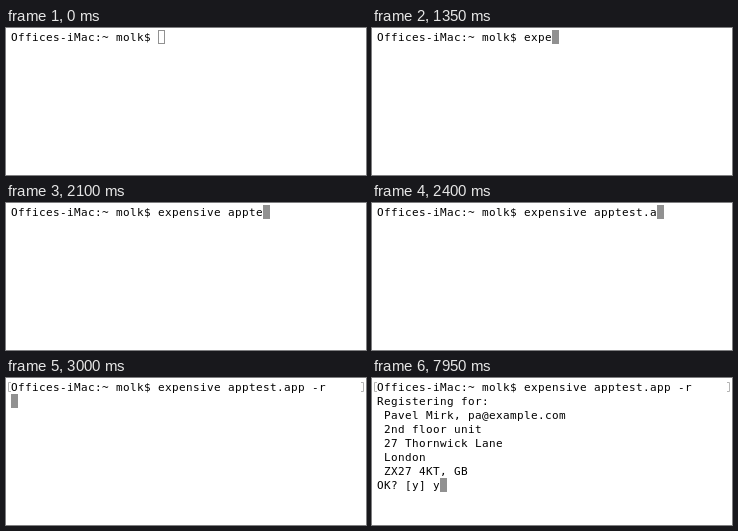
Write an HTML page with a canvas that moves like this. It is 360x147 px and loops after 8000 ms.

```html
<!DOCTYPE html>
<html lang="en">
<head>
<meta charset="utf-8">
<title>Terminal session</title>
<style>
  html, body { margin: 0; width: 100%; height: 100%; overflow: hidden; background: #fff; }
  canvas { display: block; }
</style>
</head>
<body>
<canvas id="screen" width="360" height="147"></canvas>
<script>
const ctx = document.getElementById('screen').getContext('2d');
const LOOP = 8000, TYPE_START = 1050, KEY_TICK = 150;
const ENTER = 3000, REPLY = 7350, CONFIRM = 7950;
const LEFT = 5, TOP = 2, CELL_W = 7, CELL_H = 14, BASELINE = 11;

const prompt = 'Offices-iMac:~ molk$ ';
const command = 'expensive apptest.app -r';
const typedPerTick = [1, 2, 4, 6, 8, 10, 12, 15, 17, 19, 20, 22, 24];
const reply = [
  'Registering for:',
  ' Pavel Mirk, pa@example.com',
  ' 2nd floor unit',
  ' 27 Thornwick Lane',
  ' London',
  ' ZX27 4KT, GB',
  'OK? [y] '
];

function linesAt(t) {
  if (t < TYPE_START) return [prompt];
  if (t < ENTER) {
    const tick = Math.floor((t - TYPE_START) / KEY_TICK);
    return [prompt + command.slice(0, typedPerTick[tick])];
  }
  const lines = [prompt + command];
  if (t < REPLY) return [...lines, ''];
  lines.push(...reply);
  if (t >= CONFIRM) lines[lines.length - 1] += 'y';
  return lines;
}

function drawText(text, row) {
  [...text].forEach((char, col) =>
    ctx.fillText(char, LEFT + col * CELL_W, TOP + row * CELL_H + BASELINE));
}

function drawCursor(col, row, focused) {
  const x = LEFT + col * CELL_W, y = TOP + row * CELL_H;
  ctx.fillStyle = ctx.strokeStyle = '#919191';
  if (focused) ctx.fillRect(x, y, CELL_W, CELL_H);
  else ctx.strokeRect(x + 0.5, y + 0.5, CELL_W - 1, CELL_H - 1);
}

function drawBracket(x, dir) {
  ctx.strokeStyle = '#b4b4b4';
  ctx.beginPath();
  ctx.moveTo(x + 2.5 * dir, 4.5);
  ctx.lineTo(x, 4.5);
  ctx.lineTo(x, 13.5);
  ctx.lineTo(x + 2.5 * dir, 13.5);
  ctx.stroke();
}

function draw(t) {
  const lines = linesAt(t), last = lines.length - 1;
  ctx.fillStyle = '#fff';
  ctx.fillRect(0, 0, 360, 147);
  drawCursor(lines[last].length, last, t >= TYPE_START);
  if (t >= ENTER) {
    drawBracket(2.5, 1);
    drawBracket(357.5, -1);
  }
  ctx.fillStyle = '#000';
  ctx.font = '11px "DejaVu Sans Mono", monospace';
  lines.forEach(drawText);
}

const start = performance.now();
function tick() {
  draw((performance.now() - start) % LOOP);
  requestAnimationFrame(tick);
}
tick();
</script>
</body>
</html>
```
